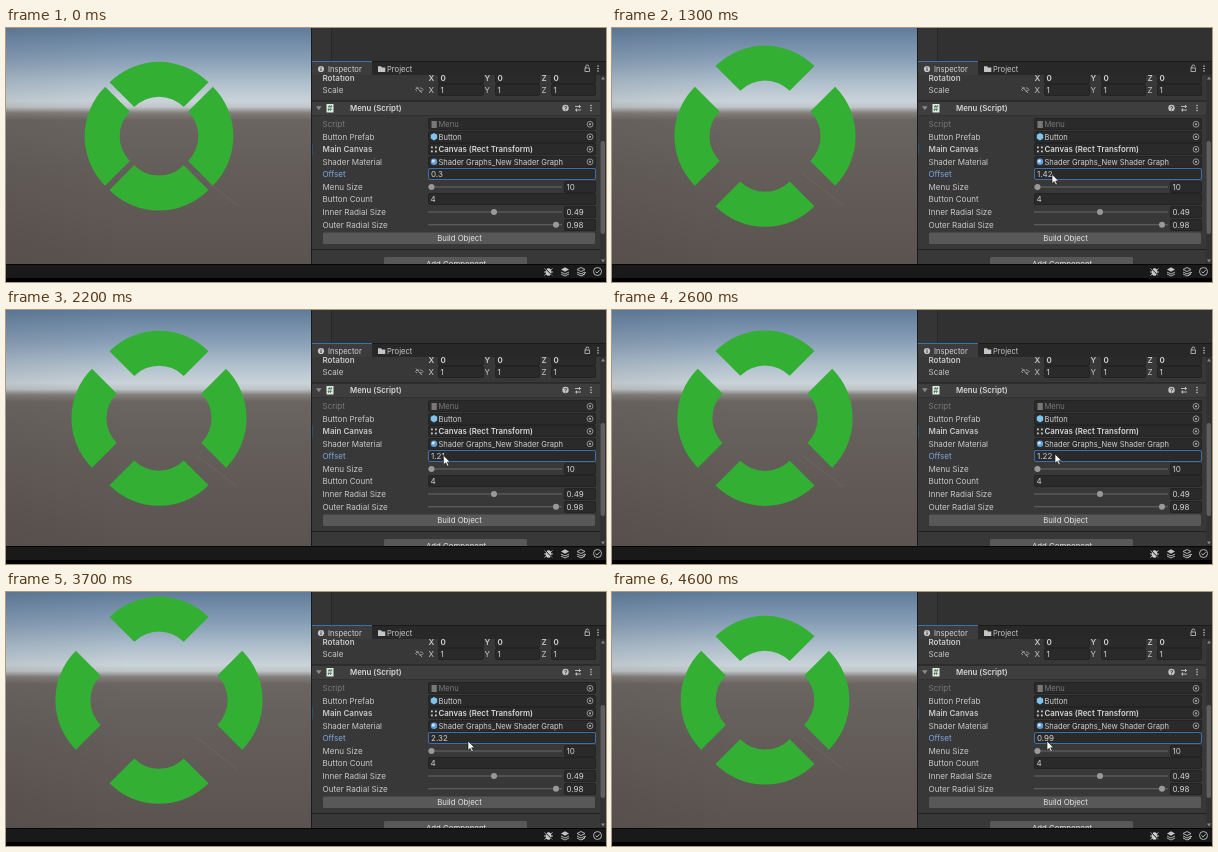
An HTML page that plays this animation: 600 px wide and 254 px high, repeating every 4.7 s.

```html
<!DOCTYPE html>
<html lang="en">
<head>
<meta charset="utf-8">
<title>Radial menu offset</title>
<style>
html, body { margin: 0; width: 100%; height: 100%; overflow: hidden; background: #000; }
svg { display: block; width: 600px; height: 254px; font-family: Inter, Roboto, sans-serif; }
</style>
</head>
<body>
<svg id="stage" viewBox="0 0 600 254">
  <defs>
    <linearGradient id="sky" x1="0" y1="0" x2="0" y2="1">
      <stop offset="0" stop-color="#607c9b"/>
      <stop offset=".13" stop-color="#879eb6"/>
      <stop offset=".235" stop-color="#b0c0cd"/>
      <stop offset=".31" stop-color="#cad3d9"/>
      <stop offset=".335" stop-color="#bfc5c9"/>
      <stop offset=".36" stop-color="#827e7a"/>
      <stop offset=".39" stop-color="#6b6561"/>
      <stop offset=".6" stop-color="#645e5a"/>
      <stop offset="1" stop-color="#5a5350"/>
    </linearGradient>
    <linearGradient id="shade">
      <stop offset="0" stop-color="#1c2024" stop-opacity=".07"/>
      <stop offset=".4" stop-color="#1c2024" stop-opacity="0"/>
    </linearGradient>
    <clipPath id="view"><rect width="305" height="236"/></clipPath>
    <clipPath id="body"><rect x="306" y="47" width="294" height="189"/></clipPath>
  </defs>
  <g clip-path="url(#view)">
    <rect width="305" height="236" fill="url(#sky)"/>
    <rect width="305" height="236" fill="url(#shade)"/>
    <path d="M190 145L231 177" stroke="#8a8581" stroke-width=".6" opacity=".4"/>
    <g id="ring" fill="#33b033"></g>
  </g>
  <g id="chrome"></g>
  <g id="panel" clip-path="url(#body)"></g>
  <path id="cursor" d="M0 0V9.2L2.2 7.3L3.8 10.7L5.3 10L3.7 6.7H6.6Z" fill="#fff" stroke="#111" stroke-width=".6"/>
</svg>
<script>
const NS = 'http://www.w3.org/2000/svg';
const byId = id => document.getElementById(id);
const LOOP = 4700, STEP = 100;
const LABEL_X = 316.5;
let layer = byId('chrome');

function add(tag, attrs, content) {
  const node = document.createElementNS(NS, tag);
  for (const key in attrs) node.setAttribute(key, attrs[key]);
  if (content !== undefined) node.textContent = content;
  return layer.appendChild(node);
}
const box = (x, y, width, height, fill, more) => add('rect', { x, y, width, height, fill, ...more });
const line = (d, stroke = '#c4c4c4', width = .9) => add('path', { d, stroke, fill: 'none', 'stroke-width': width });
const dot = (cx, cy, r, fill, more) => add('circle', { cx, cy, r, fill, ...more });
const text = (x, cy, string, size = 8.1, fill = '#c8c8c8', more) =>
  add('text', { x, y: cy + 2.9, 'font-size': size, fill, ...more }, string);
const bold = { 'font-weight': 600 };
const field = (x, cy, width, stroke = '#222') =>
  box(x + .5, Math.round(cy) - 5.5, width - 1, 11, '#2a2a2a', { stroke, 'stroke-width': .9, rx: 1.5 });
const dots = (x, cy) => [-2.5, 0, 2.5].forEach(dy => dot(x, cy + dy, .8, '#c4c4c4'));

function drawChrome() {
  box(305, 0, 295, 236, '#1a1a1a');
  box(306, 0, 19.5, 33, '#353535');
  box(326, 0, 274, 33, '#313131');
  box(306, 34, 294, 13, '#282828');
  box(306, 33, 60, 14, '#3c3c3c');
  box(306, 33, 60, 1, '#3a72b0');
  dot(315, 41, 3.1, '#c8c8c8');
  line('M315 40.3V43M315 38.8V39.7', '#383838', 1);
  text(322, 41, 'Inspector', 7.6, '#d2d2d2');
  add('path', { d: 'M372 38.3h3l1 1.2h3.3v4.6h-7.3z', fill: '#c4c4c4' });
  text(381, 41, 'Project', 7.6);
  box(579, 40, 4.6, 3.4, 'none', { stroke: '#c4c4c4', 'stroke-width': .8 });
  line('M579.8 40V38.5A1.5 1.5 0 0 1 582.8 38.5');
  dots(592, 40.5);

  box(0, 236, 600, 14, '#191919');
  box(0, 236, 600, 1, '#070707');
  add('ellipse', { cx: 542.5, cy: 244, rx: 2.8, ry: 3.8, fill: '#d0d0d0' });
  line('M538.5 240.5L546.5 247.5M538.5 247.5L546.5 240.5M538 244H547');
  line('M538 239L547 248.5', '#191919', 1);
  add('path', { d: 'M555 241.5L559 239.2L563 241.5L559 243.8Z', fill: '#c4c4c4' });
  line('M555 244L559 246L563 244M555 246L559 248L563 246');
  line('M571 241.5L575 239.5L579 241.5L575 243.5ZM571 244L575 246L579 244M571 246L575 248L579 246M576 248L580 244');
  dot(591.5, 243.5, 4, 'none', { stroke: '#c4c4c4', 'stroke-width': .9 });
  line('M589.6 243.5L591 245L593.6 242.2');
}

function drawVector(cy, label, value, style) {
  text(LABEL_X, cy, label, 8, '#c8c8c8', style);
  [['X', 424, 432, 46], ['Y', 480, 489, 45], ['Z', 537, 545, 45]].forEach(([axis, x, left, width]) => {
    text(x - 1.5, cy, axis, 8, '#c8c8c8', style);
    field(left, cy, width);
    text(left + 2.5, cy, value, 8, '#d2d2d2', style);
  });
}

function drawObjectRow(cy, label, value, { color = '#d0d0d0', labelColor = '#c8c8c8', size = 7.55, style } = {}) {
  text(LABEL_X, cy, label, 8, labelColor, style);
  field(422, cy, 168);
  text(432.5, cy, value, size, color, style);
  dot(584, cy, 2.9, 'none', { stroke: '#aaa', 'stroke-width': .8 });
  dot(584, cy, 1.1, '#aaa');
}

function drawSlider(cy, label, value, knob) {
  text(LABEL_X, cy, label);
  box(422, cy - .6, 134, 1.2, '#606060');
  dot(knob, cy, 3, '#999');
  field(558, cy, 32);
  text(560.5, cy, value, 8, '#d2d2d2');
}

function drawPanel() {
  box(306, 47, 294, 189, '#383838');
  drawVector(50, 'Rotation', '0', bold);
  drawVector(62, 'Scale', '1');
  line('M411 63L409.5 61.5L411 60H413M414 60H415.5L417 61.5L415.5 63H413.5M410 58.5L416 65', '#b0b0b0', .8);

  box(306, 73, 288, 14, '#3e3e3e');
  box(306, 72.5, 288, 1, '#1f1f1f');
  box(306, 87, 288, .8, '#303030');
  add('path', { d: 'M310 78.3h5.6l-2.8 4z', fill: '#8a8a8a' });
  box(320.5, 76, 7, 8.5, '#e4e8e4');
  text(321.4, 80, '#', 7.5, '#35764a', bold);
  text(344, 80, 'Menu (Script)', 7.8, '#d6d6d6', bold);
  dot(559.5, 80, 3.2, '#c4c4c4');
  text(557.9, 80, '?', 6, '#333', bold);
  line('M569 78.5H575M569 82H575M573.5 77V80M570.5 80.5V83.5');
  dots(585, 80);

  drawObjectRow(96.3, 'Script', 'Menu', { color: '#7a7a7a', labelColor: '#7a7a7a' });
  box(425.5, 93, 5.3, 7, '#777');
  drawObjectRow(108.8, 'Button Prefab', 'Button');
  add('path', { d: 'M428 105l3.2 1.8v3.8l-3.2 1.8l-3.2-1.8v-3.8z', fill: '#7fc3ef' });
  box(306, 115.5, 1, 11.5, '#28506f');
  drawObjectRow(121.3, 'Main Canvas', 'Canvas (Rect Transform)', { color: '#d6d6d6', size: 7.85, style: bold });
  for (let i = 0; i < 4; i++) box(425 + i % 2 * 4, 118.5 + (i >> 1) * 4, 1.8, 1.8, '#c8c8c8');
  drawObjectRow(133.8, 'Shader Material', 'Shader Graphs_New Shader Graph');
  dot(428, 133.8, 3.2, '#5f9fd8');
  dot(427.3, 133, 1.5, '#d5e6f2');

  text(LABEL_X, 146.3, 'Offset', 8, '#7da9e2');
  field(422, 146.3, 168, '#4177b4');
  const offsetText = text(425, 146.3, '', 8, '#d2d2d2');

  drawSlider(159, 'Menu Size', '10', 425.5);
  text(LABEL_X, 171.3, 'Button Count');
  field(422, 171.3, 168);
  text(424.5, 171.3, '4', 8, '#d2d2d2');
  drawSlider(184, 'Inner Radial Size', '0.49', 488);
  drawSlider(196.7, 'Outer Radial Size', '0.98', 550);

  box(317, 204.5, 272, 11.5, '#585858', { rx: 1.5 });
  text(453.5, 210, 'Build Object', 7.8, '#e4e4e4', { 'text-anchor': 'middle' });
  box(306, 221, 288, 1, '#202020');
  box(378, 229, 143, 12, '#585858', { rx: 1.5 });
  text(450, 236, 'Add Component', 7.8, '#e4e4e4', { 'text-anchor': 'middle' });

  box(594, 47, 6, 189, '#323232');
  box(594.5, 113, 4.5, 93, '#5f5f5f', { rx: 2 });
  add('path', { d: 'M595 51.5l2-3l2 3zM595 231.5l2 3l2-3z', fill: '#888' });
  return offsetText;
}

function drawRing() {
  const outer = 70, inner = outer / 2, k = Math.SQRT1_2;
  const d = `M${-outer * k} ${-outer * k}A${outer} ${outer} 0 0 1 ${outer * k} ${-outer * k}` +
    `L${inner * k} ${-inner * k}A${inner} ${inner} 0 0 0 ${-inner * k} ${-inner * k}Z`;
  return [0, 90, 180, 270].map(angle => ({ angle, node: add('path', { d }) }));
}

drawChrome();
layer = byId('panel');
const offsetText = drawPanel();
layer = byId('ring');
const segments = drawRing();
const cursor = byId('cursor');

// [time, value] pairs, joined by straight lines
const offsetKeys = [[0, .3], [600, .3], [700, .36], [900, .51], [1200, 1.42], [1500, 1.42], [1900, 1.21],
  [2500, 1.21], [2600, 1.22], [3100, 2.22], [3400, 2.8], [3700, 2.32], [4200, 1.18], [4600, .99]];
const cursorX = [[300, 427], [600, 427], [900, 431], [1200, 440], [1500, 440], [1900, 437], [2400, 438],
  [2600, 443], [3100, 462.5], [3400, 473], [3700, 462], [4200, 438], [4600, 435]];
const cursorY = [[300, 146], [1900, 146.5], [2600, 144], [3100, 144], [3700, 149], [4600, 149]];

function sample(keys, t) {
  const next = keys.findIndex(key => key[0] > t);
  if (next === 0) return keys[0][1];
  if (next < 0) return keys[keys.length - 1][1];
  const [t0, a] = keys[next - 1], [t1, b] = keys[next];
  return a + (b - a) * (t - t0) / (t1 - t0);
}

function render(now) {
  const t = Math.floor(now % LOOP / STEP) * STEP;
  const offset = Math.round(sample(offsetKeys, t) * 100) / 100;
  for (const { angle, node } of segments) {
    node.setAttribute('transform', `translate(153 108.2) rotate(${angle}) translate(0 ${-14.5 * offset})`);
  }
  offsetText.textContent = offset;
  cursor.setAttribute('visibility', t < 300 ? 'hidden' : 'visible');
  cursor.setAttribute('transform', `translate(${sample(cursorX, t)} ${sample(cursorY, t)})`);
}

const start = performance.now();
function tick() {
  render(performance.now() - start);
  requestAnimationFrame(tick);
}
tick();
</script>
</body>
</html>
```
